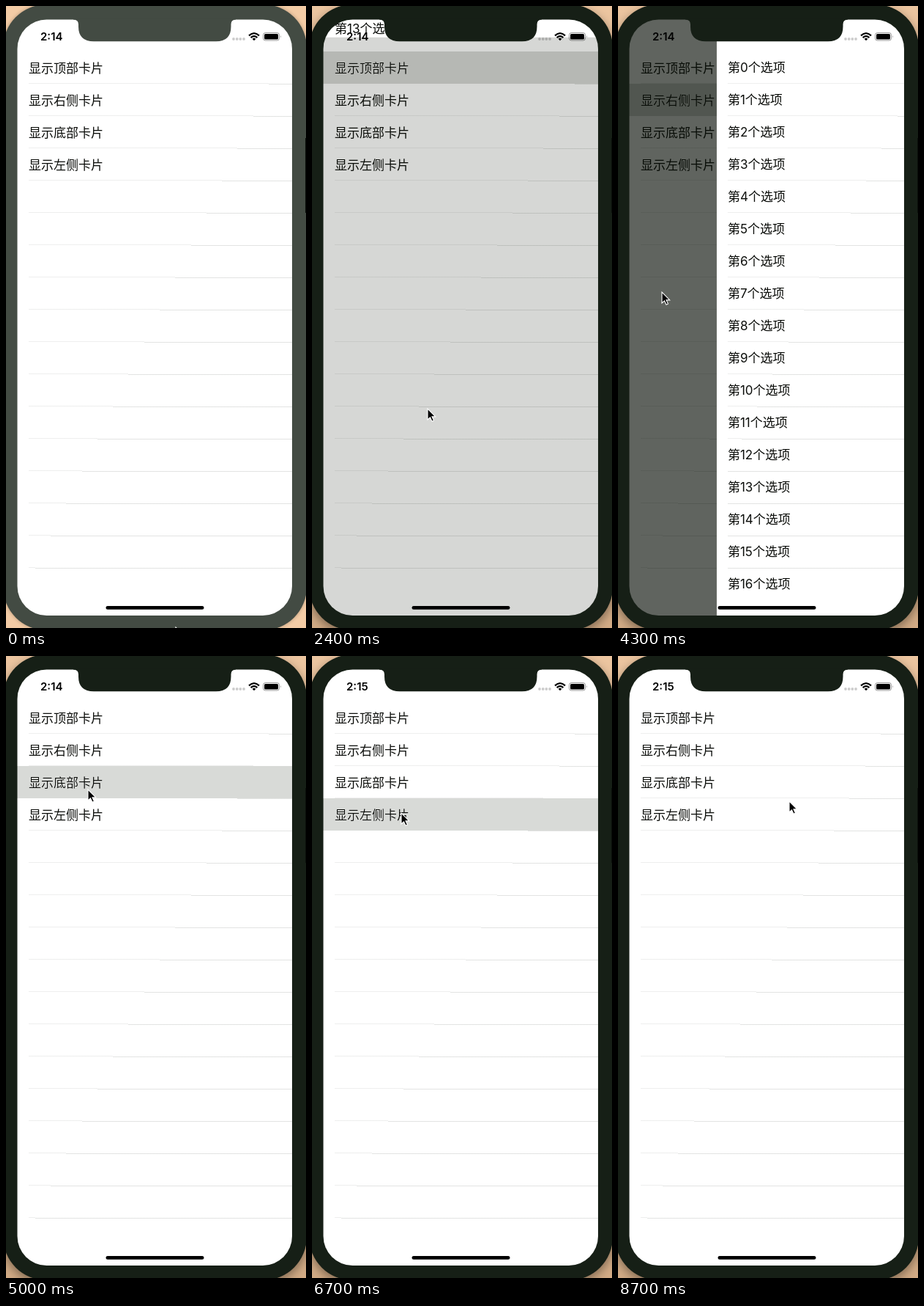
Recreate the animation shown at these times as an HTML page. Size 410 px wide and 848 px high, loop 10 s.

```html
<!DOCTYPE html>
<html lang="zh-CN">
<head>
<meta charset="utf-8">
<title>Card drawer</title>
<style>
html, body { margin: 0; width: 100%; height: 100%; overflow: hidden; }
#stage { position: relative; width: 410px; height: 848px; overflow: hidden; background: var(--desk);
  --desk: #f3cba5; --body: #434b43; --shadow: 0 0 5px #0004;
  font: 17px/44px Inter, "Noto Sans CJK SC", "Noto Sans CJK", sans-serif; color: #0b0d0a; }
#stage.active { --desk: linear-gradient(#ecc5a0, #d3ac86); --body: #161f16; --shadow: 0 5px 14px #0006; }
#phone { position: absolute; left: -4px; top: -2px; width: 415px; height: 853px; border-radius: 59px;
  background: var(--body); box-shadow: var(--shadow); }
#button { position: absolute; left: 409px; top: 180px; width: 1px; height: 102px; background: #0b100b; }
#screen { position: absolute; left: 16px; top: 18px; width: 375px; height: 813px; background: #fff;
  box-shadow: 0 0 0 1px #fff; clip-path: inset(.4px 0 0 -.5px round 40px); }
#mark, #dim { position: absolute; left: -1px; right: 0; }
#mark { height: 44px; background: #d8dad7; mix-blend-mode: darken; }
#dim { top: 0; height: 100%; background: rgb(6, 12, 4); }
.list { position: absolute; overflow: hidden; }
.card { background: #fff; }
.row { position: absolute; left: 15px; right: 0; height: 44px; white-space: nowrap; }
.menu .row { line-height: 46px; }
.row.line::after { content: ""; position: absolute; left: 0; right: 0; top: 43px; height: 2px;
  background:
    linear-gradient(90deg, #0a140a12 var(--split), #0000 var(--split)) 0 0 / 100% 1px no-repeat,
    linear-gradient(90deg, #0000 var(--split), #0a140a1e var(--split)) 0 1px / 100% 1px no-repeat; }
svg { position: absolute; left: 0; top: 0; overflow: visible; }
#clock { position: absolute; left: 47px; top: 31px; font-size: 15px; line-height: 21px; font-weight: 600; color: #000; }
</style>
</head>
<body>
<div id="stage">
  <div id="phone"></div>
  <div id="button"></div>
  <div id="screen"></div>
  <svg width="410" height="848">
    <path d="M92 17.500V18.400Q99 18.400 99 25V28Q99 48.300 120 48.300H287Q307.500 48.300 307.500 28V25Q307.500 18.400 314 18.400V17.500Z" style="fill:var(--body)"/>
    <g fill="#000" fill-opacity=".2">
      <circle cx="311" cy="45" r="1.900"/><circle cx="315.700" cy="45" r="1.900"/>
      <circle cx="320.300" cy="45" r="1.900"/><circle cx="325" cy="45" r="1.900"/>
    </g>
    <g fill="none" stroke="#000" stroke-width="2.200">
      <path d="M332 40.400Q339 34 346 40.400"/>
      <path d="M334.600 43.100Q339 39.200 343.400 43.100"/>
    </g>
    <path d="M336.600 44.800Q339 42.800 341.400 44.800L339 47.200Z"/>
    <rect x="351.500" y="36.500" width="22" height="10.500" rx="3" fill="none" stroke="#000" stroke-opacity=".4"/>
    <rect x="353" y="38" width="19" height="7.500" rx="1.600"/>
    <path d="M375 40Q376.600 41.700 375 43.500Z" fill-opacity=".45"/>
    <rect x="136.500" y="818" width="134" height="4.800" rx="2.400"/>
  </svg>
  <div id="clock"></div>
  <svg id="cursor" width="14" height="20">
    <path d="M0 0V15L3.500 11.900L6 17.200L8.400 16.100L6 10.900H10.700Z" stroke="#fff" stroke-width="1.100"/>
  </svg>
</div>
<script>
const LOOP = 10000, STEP = 100;
const OPEN = 250, CLOSE = 200, FADE = 258, DIM = 0.7;
const $ = id => document.getElementById(id);

function addLayer(id) {
  const el = document.createElement('div');
  el.id = id;
  $('screen').append(el);
  return el;
}

// Each separator steps down one pixel where a diagonal crosses it.
function makeList(kind, x, y, w, h, pad, count, label) {
  const list = document.createElement('div');
  list.className = 'list ' + kind;
  list.style.cssText = `left:${x}px;top:${y}px;width:${w}px;height:${h}px`;
  for (let i = 0; i < count; i++) {
    const row = document.createElement('div'), top = pad + i * 44, bottom = y + top + 44;
    row.className = bottom < 780 ? 'row line' : 'row';
    row.style.top = top + 'px';
    row.style.setProperty('--split', 328 - x - 0.4836 * (bottom - 88) + 'px');
    row.textContent = label(i);
    list.append(row);
  }
  $('screen').append(list);
  return list;
}

const sides = ['顶部', '右侧', '底部', '左侧'];
makeList('menu', 0, 0, 375, 813, 44, 16, i => sides[i] ? `显示${sides[i]}卡片` : '');
const mark = addLayer('mark'), dim = addLayer('dim');

// box: x, y, w, h, top inset; off: hidden offset; times: tap, open, close
const cards = [
  { box: [0, 0, 375, 650, 44], off: [0, -650], tap: 1200, open: 1300, close: 2225 },
  { box: [75, 0, 300, 813, 44], off: [300, 0], tap: 3200, open: 3301, close: 4250 },
  { box: [0, 163, 375, 650, 0], off: [0, 650], tap: 5000, open: 5080, close: 5850 },
  { box: [0, 0, 300, 813, 44], off: [-300, 0], tap: 6700, open: 6800, close: 7782 }
];
for (const c of cards) c.el = makeList('card', ...c.box, 17, i => `第${i}个选项`);

// time, x, y
const path = [
  [0, 232, 847], [200, 226, 770], [500, 130, 140], [800, 112, 82], [1300, 112, 82],
  [2000, 172, 700], [2300, 170, 690], [2400, 158, 549], [3000, 118, 128], [3300, 118, 135],
  [3500, 151, 309], [4200, 60, 390], [4300, 60, 390], [4800, 112, 182], [5100, 112, 182],
  [5700, 130, 118], [5900, 130, 118], [6300, 122, 214], [6800, 122, 214],
  [7400, 340, 209], [7800, 340, 209], [8700, 234, 198], [LOOP, 234, 198]
];

const clamp = v => Math.min(1, Math.max(0, v));
const ease = v => (1 - Math.cos(Math.PI * clamp(v))) / 2;
const shown = (t, c, dOpen, dClose) => ease((t - c.open) / dOpen) - ease((t - c.close) / dClose);

function cursorAt(t) {
  const i = path.findIndex(p => p[0] > t), a = path[i - 1], b = path[i];
  const k = (t - a[0]) / (b[0] - a[0]);
  return [a[1] + (b[1] - a[1]) * k, a[2] + (b[2] - a[2]) * k];
}

function draw(t) {
  let shade = 0, row = 0, glow = 0;
  cards.forEach((c, i) => {
    const hide = 1 - shown(t, c, OPEN, CLOSE);
    c.el.style.transform = `translate(${c.off[0] * hide}px,${c.off[1] * hide}px)`;
    c.el.style.visibility = hide > 0.999 ? 'hidden' : 'visible';
    shade = Math.max(shade, shown(t, c, FADE, FADE));
    if (t >= c.tap) {
      row = i;
      glow = 1 - clamp((t - c.close - CLOSE) / 250);
    }
  });
  dim.style.opacity = shade * DIM;
  mark.style.top = 44 + row * 44 + 'px';
  mark.style.opacity = glow;
  $('stage').classList.toggle('active', t >= 600);
  $('clock').textContent = t < 5900 ? '2:14' : '2:15';
  const [x, y] = cursorAt(t);
  $('cursor').style.transform = `translate(${x}px,${y}px)`;
}

const start = performance.now();
function tick() {
  const t = (performance.now() - start) % LOOP;
  draw(Math.floor(t / STEP) * STEP);
  requestAnimationFrame(tick);
}
tick();
</script>
</body>
</html>
```
